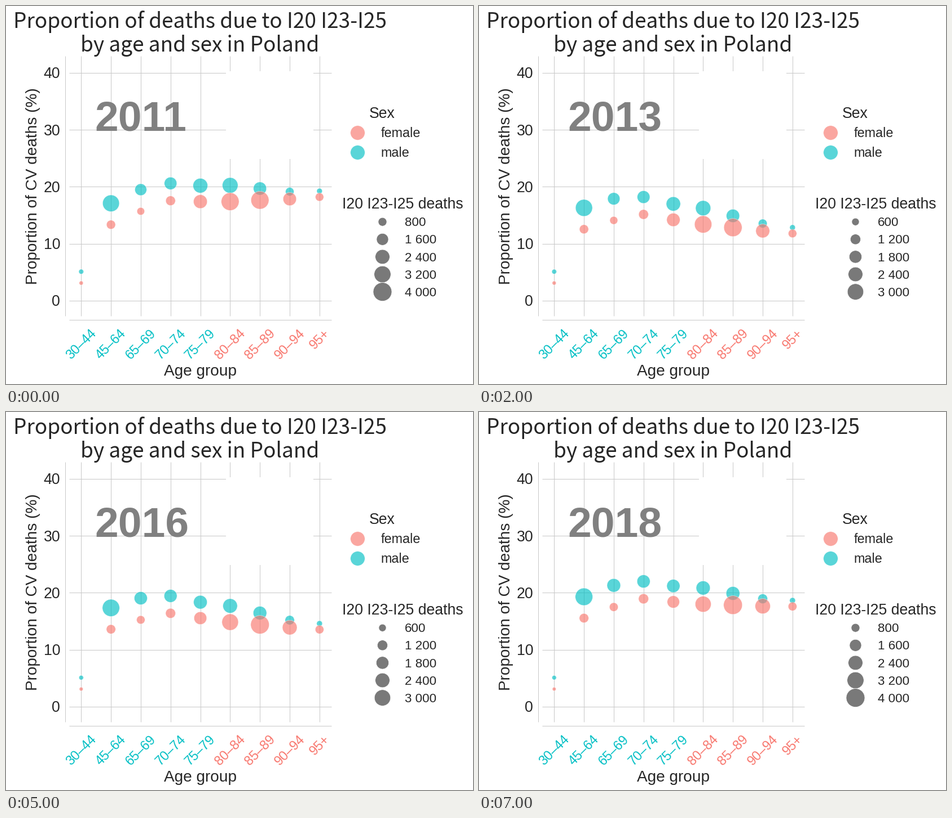
A matplotlib script that plays this animation: 828 by 672 pixels, repeating every 8 s.

```python
import numpy as np
import matplotlib.pyplot as plt
from matplotlib.animation import FuncAnimation
from matplotlib.patches import Rectangle

W, H, DPI = 828, 672, 96
PT = 72 / DPI  # points per pixel

INK, GRID, GREY = "#262626", "#c8c8c8", "#808080"
FEMALE, MALE = "#F8766D", "#00BFC4"
ALPHA = 0.65

AGES = ["30–44", "45–64", "65–69", "70–74", "75–79",
        "80–84", "85–89", "90–94", "95+"]
AGE = np.arange(len(AGES))
FIRST_YEAR, YEARS = 2011, 8

# Typical share of deaths (%) and bubble radius (px) by age group
SHARE = {
    MALE: [5.1, 16.3, 17.9, 18.2, 17.0, 16.25, 14.9, 13.55, 12.85],
    FEMALE: [3.1, 12.55, 14.1, 15.15, 14.2, 13.4, 12.85, 12.25, 11.8],
}
RADIUS = {
    MALE: [3.8, 14.8, 10.9, 11, 12, 12.8, 11.5, 7.7, 4.7],
    FEMALE: [3.1, 7.8, 6.9, 8.4, 11.2, 14.6, 15.9, 12.3, 7.2],
}


def share(color, k):
    """Each year shifts and tilts the curve, except for the youngest."""
    keys = [0, 2, 4, 5, 7]
    level = np.interp(k, keys, [0, 0, -0.8, 0.95, 2.6])
    tilt = np.interp(k, keys, [0.8, 0, 0.1, 0.1, 0.4])
    return SHARE[color] + np.where(AGE > 0, level + tilt * AGE, 0)


def radius(color, k):
    """Larger birth cohorts move slowly through the age groups."""
    drift = k / (YEARS - 1) - 0.5
    wave = np.cos(2 * np.pi * (AGE - 2) / 5)
    return RADIUS[color] * (1 + 0.14 * drift * wave)


def size_keys(k):
    peak = np.interp(k, [0, 2, 5, 7], [4250, 3450, 3600, 4400])
    step = 800 if peak > 3700 else 600
    count = min(5, int(peak // step))
    return step * np.arange(1, count + 1)


def x_of(i):
    return 133.3 + 52.82 * i


def y_of(pct):
    return 523.9 - 10.125 * pct


plt.rcParams["font.family"] = "Liberation Sans"
fig = plt.figure(figsize=(W / DPI, H / DPI), dpi=DPI, facecolor="white")
ax = fig.add_axes([0, 0, 1, 1])
ax.set_xlim(0, W)
ax.set_ylim(H, 0)
ax.axis("off")


def label(x, y, text, size, color=INK, **kw):
    kw.setdefault("va", "baseline")
    return ax.text(x, y, text, fontsize=size * PT, color=color, **kw)


def line(xs, ys):
    ax.plot(xs, ys, color=GRID, lw=PT, solid_capstyle="butt", zorder=1)


def dots(color, alpha=ALPHA, zorder=4):
    return ax.scatter([], [], color=color, alpha=alpha, zorder=zorder,
                      edgecolors="white", linewidths=0.5)


def place(coll, xs, ys, radii):
    # The white rim covers a little of each disc
    coll.set_offsets(np.column_stack([xs, ys]))
    coll.set_sizes((2 * (np.asarray(radii) + 0.3) * PT) ** 2)


# Grid and axis lines
top, bottom, left, right = 89, 551, 112, 577
for i, age in enumerate(AGES):
    line([x_of(i)] * 2, [top, bottom])
    label(x_of(i), 570, age, 23.33, MALE if i < 5 else FEMALE,
          rotation=45, ha="center", va="top")
for pct in range(0, 50, 10):
    line([left, right], [y_of(pct)] * 2)
    label(96.2, y_of(pct) + 9.5, str(pct), 26.67, ha="right")
line([105.4] * 2, [top, bottom])
line([left, right], [558.4] * 2)
ax.add_patch(Rectangle((390, 116), 155, 156, color="white", lw=0, zorder=2))

# Titles
for y, text in [(39, "Proportion of deaths due to I20 I23-I25"),
                (81.5, "by age and sex in Poland")]:
    label(344, y, text, 37, ha="center", family="Noto Sans CJK JP")
label(345, 656.7, "Age group", 28, ha="center")
label(54.6, 319.8, "Proportion of CV deaths (%)", 28, ha="center",
      rotation=90, rotation_mode="anchor")
year_text = label(157.6, 221.7, "", 75, GREY, weight="bold")

# Sex legend
label(643.8, 198.8, "Sex", 26.67)
for y, text, color in [(225.3, "female", FEMALE), (260.3, "male", MALE)]:
    place(dots(color), [622.5], [y], [12.5])
    label(664.5, y + 8, text, 23.33)

# Size legend
label(595.5, 359.8, "I20 I23-I25 deaths", 26.67)
key_y = 383.7 + 31.1 * np.arange(5)
key_dots = dots("#797979", alpha=1)
key_texts = [label(706.7, y + 7.6, "", 22.4) for y in key_y]

bubbles = {MALE: dots(MALE, zorder=4), FEMALE: dots(FEMALE, zorder=5)}


def update(k):
    year_text.set_text(str(FIRST_YEAR + k))
    for color, coll in bubbles.items():
        place(coll, x_of(AGE), y_of(share(color, k)), radius(color, k))

    deaths = size_keys(k)
    count = len(deaths)
    place(key_dots, [667.5] * count, key_y[:count], 0.256 * np.sqrt(deaths))
    for i, text in enumerate(key_texts):
        shown = f"{deaths[i]:,}".replace(",", " ") if i < count else ""
        text.set_text(shown)
    return year_text, *bubbles.values(), key_dots, *key_texts


anim = FuncAnimation(fig, update, frames=YEARS, interval=1000,
                     repeat=True, repeat_delay=0, blit=False)
plt.show()
```
